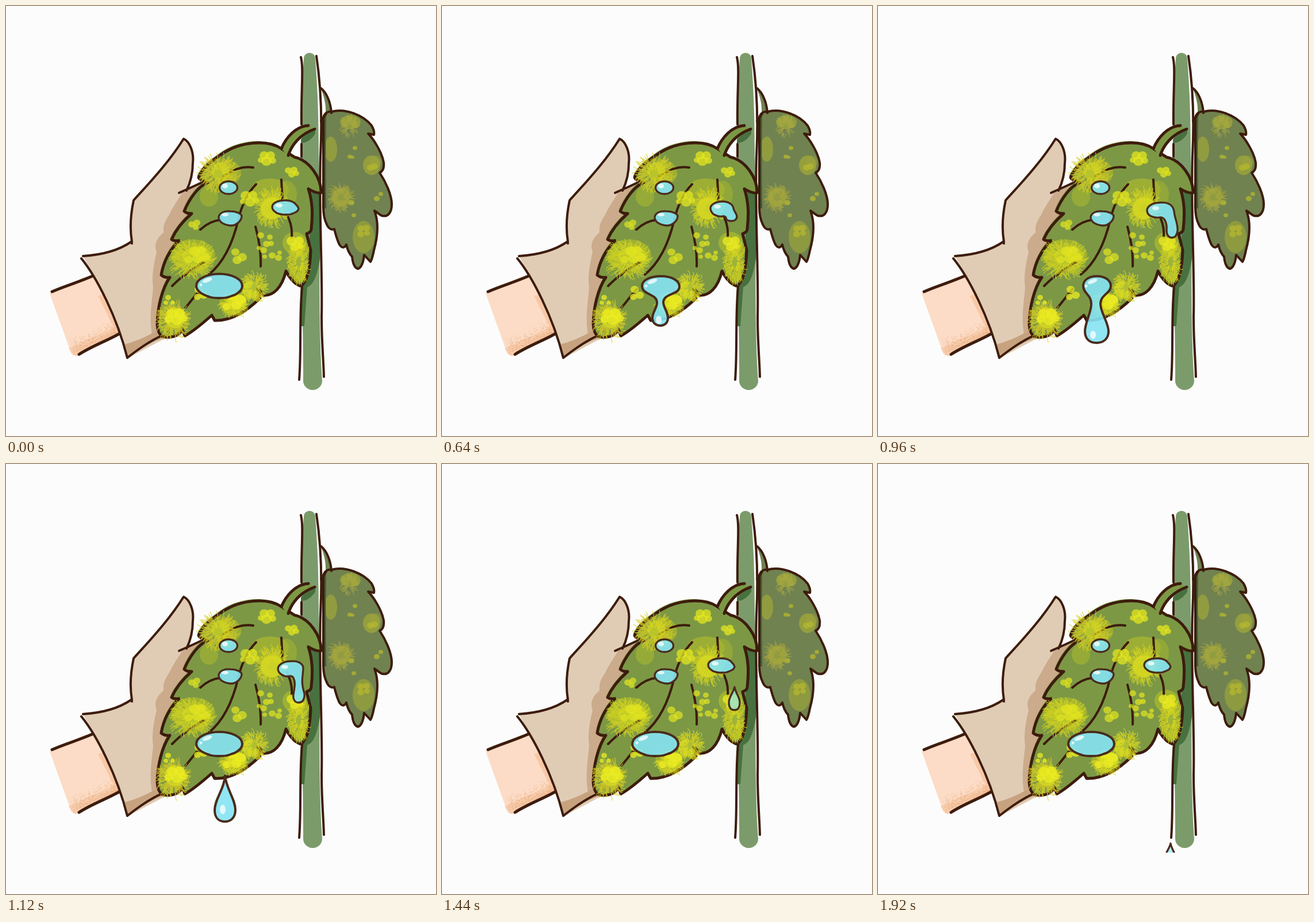
These frames come from a looping animation (748x748 px, 2000 ms). An HTML page:

```html
<!DOCTYPE html>
<html lang="en">
<head>
<meta charset="utf-8">
<title>Dripping leaf</title>
<style>
html, body { margin: 0; width: 100%; height: 100%; overflow: hidden; background: #fcfcfc; }
svg { display: block; width: 100vw; height: 100vh; }
.line { fill: none; stroke: #3d1c0d; stroke-width: 4; stroke-linecap: round; stroke-linejoin: round; }
.thick { stroke-width: 5; }
.water { fill: #86e4f3; fill-opacity: .9; stroke: #4a2b1c; stroke-width: 4; stroke-linejoin: round; }
.thin { stroke-width: 3.3; }
.fuzz { fill: none; stroke-linecap: round; stroke-width: 1.3; }
.shine { fill: #fff; opacity: .75; }

/* One drawing step lasts 80 ms, which is 4% of the loop. */
.anim { animation: 2s infinite; }
#bigPool { animation-name: bigPool; }
#bigShine { animation-name: bigShine; }
#bulbShine { animation-name: bulbShine; }
#bigDrop { animation-name: bigDrop; }
#sidePool { animation-name: sidePool; }
#sideShine { animation-name: sideShine; }
#sideDrop { animation-name: sideDrop; }

@keyframes bigPool {
  0%, 56%, 100% { animation-timing-function: steps(4);
    d: path("M331 487C331 475 349 466 371 466C393 466 411 475 411 487C411 493 405 499 397 503C393 504 391 505 388 506C383 508 376 508 371 508C366 508 359 508 354 506C351 505 348 504 344 502C337 499 331 493 331 487Z"); }
  16% { animation-timing-function: steps(4);
    d: path("M342 486C342 475 357 467 377 467C397 467 412 475 412 489C412 496 407 501 400 504C397 506 394 506 390 507C386 508 382 508 377 508C372 508 367 507 362 505C358 503 355 501 352 499C345 495 342 491 342 486Z"); }
  32% { animation-timing-function: steps(4);
    d: path("M348 487C348 477 362 470 381 470C400 470 413 478 413 488C413 503 385 499 385 516C386 526 393 532 393 543C393 551 387 556 380 556C372 556 366 551 366 543C366 532 374 526 374 516C374 500 348 503 348 487Z"); }
  48% { animation-timing-function: step-end;
    d: path("M357 487C357 477 366 470 381 470C396 470 405 478 405 487C405 500 387 502 387 518C387 534 401 550 401 566C401 579 392 586 380 586C368 586 360 579 360 566C360 550 371 534 371 518C371 502 357 500 357 487Z"); }
  52% { animation-timing-function: step-end;
    d: path("M362 486C362 478 369 472 381 472C393 472 400 478 400 486C400 497 384 502 384 518C384 540 401 562 401 582C401 596 392 604 380 604C368 604 361 596 361 582C361 562 379 540 379 518C379 502 362 497 362 486Z"); }
}
@keyframes bigShine {
  0%, 56%, 100% { transform: none; animation-timing-function: steps(4); }
  16% { transform: translate(11px, 0); animation-timing-function: steps(4); }
  32% { transform: translate(16px, 2px); animation-timing-function: steps(4); }
  48% { transform: translate(23px, 2px); animation-timing-function: step-end; }
}
@keyframes bulbShine {
  0%, 56%, 100% { opacity: 0; transform: translate(2px, -30px); animation-timing-function: step-end; }
  28% { opacity: .75; transform: translate(3px, -36px); animation-timing-function: steps(1); }
  32% { opacity: .75; transform: translate(3px, -26px); animation-timing-function: steps(4); }
  48% { opacity: .75; transform: none; animation-timing-function: step-end; }
  52% { opacity: .75; transform: translate(0, 17px); animation-timing-function: step-end; }
}
@keyframes bigDrop {
  0%, 72%, 100% { opacity: 0; animation-timing-function: step-end; }
  56% { opacity: 1; transform: none; animation-timing-function: step-end; }
  60% { opacity: 1; transform: translateY(28px); animation-timing-function: step-end; }
  64% { opacity: 1; transform: translateY(66px); animation-timing-function: step-end; }
  68% { opacity: 1; transform: translateY(113px); animation-timing-function: step-end; }
}
@keyframes sidePool {
  0%, 68%, 100% { animation-timing-function: steps(4);
    d: path("M463 350C463 342 474 338 486 338C493 338 500 340 504 345C507 348 509 350 509 353C508 356 506 358 503 359C500 361 498 361 496 362C493 363 490 363 487 363C480 363 475 362 471 360C466 357 463 354 463 350Z"); }
  16% { animation-timing-function: steps(4);
    d: path("M465 350C465 342 476 339 487 339C495 339 502 342 506 348C509 351 511 354 511 357C510 360 508 361 505 362C502 363 499 363 497 363C494 363 491 363 487 363C480 363 475 362 472 360C467 357 465 354 465 350Z"); }
  32% { animation-timing-function: steps(4);
    d: path("M467 352C467 345 477 340 488 340C498 340 506 345 507 352C508 358 513 361 513 367C512 373 507 374 503 374C498 374 494 372 494 368C493 366 490 365 487 366C480 367 476 364 472 362C469 359 467 356 467 352Z"); }
  48% { animation-timing-function: steps(2);
    d: path("M468 355C469 347 479 342 491 342C503 341 513 345 515 357C516 370 522 378 521 391C520 399 517 403 511 403C505 403 502 397 502 390C503 380 500 370 494 368C490 367 488 369 484 368C474 367 468 363 468 355Z"); }
  56% { animation-timing-function: steps(2);
    d: path("M473 356C474 348 484 343 496 343C508 342 516 347 517 354C517 370 512 376 519 399C520 409 516 415 509 415C502 415 499 409 500 401C502 388 504 380 500 372C497 366 491 371 485 369C478 367 473 362 473 356Z"); }
  64% { animation-timing-function: step-end;
    d: path("M478 356C479 349 487 345 497 345C507 344 515 349 515 355C514 370 509 380 519 407C520 416 515 422 509 422C502 422 499 416 500 408C503 391 507 382 503 374C499 367 494 370 489 368C482 366 478 361 478 356Z"); }
}
@keyframes sideShine {
  0%, 68%, 100% { transform: none; animation-timing-function: steps(8); }
  32% { transform: translate(4px, 2px); animation-timing-function: steps(6); }
  56% { transform: translate(10px, 6px); animation-timing-function: step-end; }
}
@keyframes sideDrop {
  0%, 100% { opacity: 0; animation-timing-function: step-end; }
  68% { opacity: 1; transform: translateY(-3px); animation-timing-function: step-end; }
  72% { opacity: 1; transform: none; animation-timing-function: step-end; }
  76% { opacity: 1; transform: translateY(8px); animation-timing-function: step-end; }
  80% { opacity: 1; transform: translateY(30px); animation-timing-function: step-end; }
  84% { opacity: 1; transform: translateY(68px); animation-timing-function: step-end; }
  88% { opacity: 1; transform: translateY(121px); animation-timing-function: step-end; }
  92% { opacity: 1; transform: translateY(189px); animation-timing-function: step-end; }
  96% { opacity: 1; transform: translateY(272px); animation-timing-function: step-end; }
}
</style>
</head>
<body>
<svg viewBox="0 0 748 748">
  <defs>
    <clipPath id="floor"><path d="M0 0H748V675.5H0Z"/></clipPath>
    <path id="backLeaf" d="M552 194C554 186 560 183 566 184C590 177 622 190 636 208C640 215 641 220 640 224L630 222C640 232 654 255 657 272C658 282 655 288 650 290C660 305 671 328 671 345C671 360 664 367 655 365C650 364 645 358 641 356C648 375 647 400 640 425C638 435 636 442 634 445L623 433C622 445 618 456 612 457C605 455 603 446 602 436C598 432 594 424 592 415C588 422 584 421 580 415C575 405 573 395 571 388C566 390 561 387 558 380C553 370 552 360 552 350Z"/>
    <path id="leaf" d="M479 248C455 232 405 235 372 260C350 275 340 285 335 298C337 304 346 305 351 307C335 313 319 335 310 357C314 361 318 361 323 361C308 374 295 390 288 406C292 409 296 409 301 408C284 425 274 445 270 468C275 472 280 473 285 472C271 492 264 525 263 550C263 566 268 576 278 576C290 577 301 573 307 563L311 574C326 566 341 553 358 538L363 547C392 548 420 530 442 508L438 492L447 503C465 505 480 490 487 461C491 470 501 484 513 487C526 478 529 450 530 425L523 396C529 394 531 391 531 388C534 360 533 340 526 318C534 323 542 326 548 325C549 300 528 268 502 263Z"/>
  </defs>

  <!-- stem -->
  <path fill="#7c9b6b" d="M518 92C518 78 538 78 538 92C541 130 544 180 544 260C548 400 542 540 550 652A16.5 16 0 0 1 517 652C518 560 510 400 514 240C515 160 516 120 518 92Z"/>
  <path fill="#48713f" d="M513 232C520 225 530 218 538 212L538 222C532 232 522 239 513 238ZM528 322L548 322L546 440C541 470 535 485 524 489L519 557H511L513 480L528 440Z"/>
  <path class="line" d="M513 89C518 108 513 150 514 206M514 240V262M515 488C510 540 514 600 510 650M540 87C548 140 550 200 547 260C544 350 551 470 549 540C549 585 552 610 553 645"/>

  <!-- back leaf -->
  <path fill="#6f8353" d="M548 144C560 154 565 170 566 188H556C557 170 553 157 548 144Z"/>
  <use href="#backLeaf" fill="#70824f"/>
  <g id="backSpots"></g>
  <path fill="#3f5c36" d="M550 194L557 188C556 240 556 300 557 352H550Z"/>
  <use href="#backLeaf" class="line"/>
  <path class="line" d="M548 143C559 152 565 170 566 186M548 200L557 187"/>

  <!-- arm -->
  <path fill="#fcdcc6" d="M76 500L135 472L152 469L201 565L128 607C120 611 114 607 112 600Z"/>
  <path fill="#f8c8a6" d="M160 504L177 501L190 538L198 567L178 578L189 562Z"/>
  <path fill="#f6c49e" opacity=".6" d="M109 595L190 558L201 566L128 608C118 610 114 606 109 595Z"/>
  <path id="grain" stroke="#e9a878" stroke-width="1.4" stroke-linecap="round" opacity=".65"/>
  <path class="line thick" d="M80 497C102 487 128 480 152 469M127 606C150 591 177 582 199 569"/>

  <!-- glove -->
  <path fill="#e0ccb5" d="M134 436C165 433 193 426 218 410C214 380 219 352 222 338C248 309 282 274 309 231C320 236 327 255 325 272C325 291 320 309 315 320L345 305L350 420L285 574L213 612C191 540 160 480 134 436Z"/>
  <path fill="#cbab8b" d="M345 305L306 326C295 343 289 352 284 363C276 375 273 382 274 394C262 404 257 415 262 428C257 450 253 470 256 490C253 520 249 545 254 571L300 570L350 400Z"/>
  <path fill="#c7a27f" d="M207 588C228 583 248 573 268 562L276 577C253 583 231 600 211 611Z"/>
  <path class="line" d="M134 435C165 433 195 426 218 410L219 413M219 410C214 380 219 352 222 338C248 309 282 274 309 231C320 236 327 255 325 272C325 291 320 309 314 321M301 325C315 319 330 312 345 305M131 439C157 471 193 540 211 612C231 596 251 582 272 573"/>

  <!-- front leaf -->
  <use href="#leaf" fill="#7c9845" transform="translate(-2 -3)"/>
  <use href="#leaf" fill="#7c9845"/>
  <path fill="#7c9845" d="M479 249C488 229 504 209 526 208L537 214C512 224 498 241 491 262Z"/>
  <g id="paleSpots"></g>
  <path class="line" d="M430 281C412 278 390 285 376 299M435 310C423 322 410 345 404 372C395 410 379 446 353 467M479 302L481 342M488 362C496 376 498 390 497 402M434 384C441 410 444 430 443 453M338 389C350 378 361 373 374 372M289 487C308 467 328 456 350 442M312 525C321 515 329 503 339 492"/>
  <use href="#leaf" class="line thick" style="stroke-dasharray:none"/>
  <path fill="#7c9845" d="M481 250C486 238 493 229 500 222L505 236C498 244 494 253 491 263Z"/>
  <path class="line thick" d="M479 248C487 229 504 209 526 208M491 260C497 241 512 223 537 214"/>
  <g id="brightSpots"></g>

  <!-- water -->
  <ellipse class="water thin" cx="387" cy="316" rx="15.5" ry="11"/>
  <ellipse class="shine" cx="381" cy="313" rx="5" ry="4"/>
  <path class="water thin" d="M370 368C370 360 380 356 390 357C400 357 410 361 410 366C409 375 400 382 391 382C380 381 370 376 370 368Z"/>
  <ellipse class="shine" cx="381" cy="363" rx="6" ry="3" opacity=".5"/>
  <g clip-path="url(#floor)">
    <path id="sidePool" class="water thin anim" d="M463 350C463 342 474 338 486 338C493 338 500 340 504 345C507 348 509 350 509 353C508 356 506 358 503 359C500 361 498 361 496 362C493 363 490 363 487 363C480 363 475 362 471 360C466 357 463 354 463 350Z"/>
    <ellipse id="sideShine" class="shine anim" cx="475" cy="347" rx="6" ry="3.5"/>
    <path id="bigPool" class="water anim" d="M331 487C331 475 349 466 371 466C393 466 411 475 411 487C411 493 405 499 397 503C393 504 391 505 388 506C383 508 376 508 371 508C366 508 359 508 354 506C351 505 348 504 344 502C337 499 331 493 331 487Z"/>
    <g id="bigShine" class="anim">
      <ellipse class="shine" cx="350" cy="477" rx="9" ry="3.5" transform="rotate(-22 350 477)"/>
      <circle class="shine" cx="339" cy="485" r="2.5"/>
    </g>
    <ellipse id="bulbShine" class="shine anim" cx="374" cy="572" rx="5" ry="7" opacity="0"/>
    <g id="bigDrop" class="anim" opacity="0">
      <path class="water" d="M381 542C383 565 399 583 399 602C399 615 391 622 381 622C370 622 363 615 363 602C363 583 380 565 381 542Z"/>
      <ellipse class="shine" cx="377" cy="601" rx="5" ry="8"/>
    </g>
    <g id="sideDrop" class="anim" opacity="0">
      <path class="water thin" style="fill-opacity:.68" d="M509 388C510 397 518 405 518 415C518 424 514 428 509 428C503 428 499 424 499 415C499 405 507 397 509 388Z"/>
    </g>
  </g>
</svg>
<script>
const byId = id => document.getElementById(id);
let seed = 11;
const rand = () => (seed = seed * 16807 % 2147483647) / 2147483647;

function add(group, tag, attrs) {
  const el = document.createElementNS("http://www.w3.org/2000/svg", tag);
  for (const key in attrs) el.setAttribute(key, attrs[key]);
  byId(group).append(el);
}

function blob(group, cx, cy, rx, ry, fill, opacity = 1) {
  add(group, "ellipse", { cx, cy, rx, ry, fill, opacity });
}

// Triples of x, y and radius
function dots(group, list, fill, opacity) {
  for (let i = 0; i < list.length; i += 3)
    blob(group, list[i], list[i + 1], list[i + 2], list[i + 2] * .9, fill, opacity);
}

// Short bent brush hairs that point away from the centre
function fuzz(group, cx, cy, rx, ry, count, stroke, opacity = .75) {
  let d = "";
  for (let i = 0; i < count; i++) {
    const a = rand() * 2 * Math.PI, r = .2 + rand() * .55, len = .15 + rand() * .25;
    const at = (k, turn) => [cx + Math.cos(a + turn) * rx * k, cy + Math.sin(a + turn) * ry * k]
      .map(v => v.toFixed(1)).join(" ");
    d += `M${at(r, 0)}Q${at(r + len / 2, .12)} ${at(r + len, (rand() - .5) * .3)}`;
  }
  add(group, "path", { d, stroke, opacity, class: "fuzz" });
}

const dull = "#9ca43b", olive = "#a5b531", lemon = "#e3e51f";

blob("backSpots", 599, 202, 18, 12, dull, .8);
fuzz("backSpots", 598, 209, 17, 20, 110, "#b1ae42", .6);
blob("backSpots", 565, 249, 11, 22, dull, .75);
blob("backSpots", 636, 277, 15, 17, dull, .85);
blob("backSpots", 643, 271, 10, 11, dull, .5);
blob("backSpots", 583, 333, 16, 16, dull, .75);
fuzz("backSpots", 583, 333, 23, 25, 180, "#aaa83e", .7);
blob("backSpots", 622, 402, 19, 28, dull, .7);
dots("backSpots", [607, 247, 4, 598, 262, 4, 603, 263, 3, 634, 281, 6, 641, 279, 6, 601, 342, 5, 605, 364, 4,
  645, 335, 5, 652, 327, 4, 617, 387, 6, 627, 386, 6, 617, 397, 6, 628, 395, 5], "#b4b72f", .75);

blob("paleSpots", 384, 290, 25, 22, olive, .8);
blob("paleSpots", 353, 331, 16, 18, olive, .65);
blob("paleSpots", 459, 320, 33, 20, olive, .8);
blob("paleSpots", 488, 328, 18, 24, olive, .55);
blob("paleSpots", 325, 433, 39, 27, olive, .85);
blob("paleSpots", 502, 412, 21, 19, olive, .85);
blob("paleSpots", 395, 517, 24, 20, olive, .85);

fuzz("brightSpots", 369, 292, 36, 34, 260, "#d9cf20");
blob("brightSpots", 373, 287, 16, 15, lemon, .4);
blob("brightSpots", 463, 352, 20, 19, lemon, .75);
fuzz("brightSpots", 464, 352, 30, 36, 260, "#d8d71f");
fuzz("brightSpots", 324, 441, 40, 34, 300, "#d5d41f");
blob("brightSpots", 332, 436, 26, 17, lemon, .35);
fuzz("brightSpots", 509, 446, 20, 42, 250, "#d9d61d");
blob("brightSpots", 510, 444, 8, 18, lemon, .35);
fuzz("brightSpots", 291, 547, 30, 34, 280, "#dccf20");
blob("brightSpots", 294, 542, 18, 18, lemon, .6);
fuzz("brightSpots", 432, 489, 25, 27, 220, "#dcd91f");
blob("brightSpots", 426, 494, 15, 15, lemon, .5);
fuzz("brightSpots", 397, 521, 27, 21, 180, "#dcd91f");
blob("brightSpots", 402, 513, 16, 12, lemon, .7);

dots("brightSpots", [449, 260, 8, 460, 260, 8, 453, 270, 9, 443, 268, 5, 464, 269, 6,
  491, 286, 6, 501, 285, 6, 497, 293, 6, 505, 291, 5, 417, 330, 9, 429, 329, 8, 425, 341, 9, 435, 338, 6, 412, 340, 5], lemon, .75);
dots("brightSpots", [323, 380, 6, 332, 377, 6, 330, 385, 5, 399, 428, 7, 411, 437, 8, 402, 442, 8,
  443, 399, 6, 459, 402, 5, 453, 414, 6, 461, 413, 5, 448, 425, 6, 440, 421, 4, 450, 436, 4, 463, 434, 6, 474, 438, 6, 476, 429, 4,
  328, 426, 9, 340, 425, 8, 333, 439, 9, 347, 437, 8, 318, 441, 7], lemon, .7);
dots("brightSpots", [497, 409, 9, 510, 408, 8, 502, 419, 8, 513, 418, 5, 282, 507, 5, 290, 516, 4, 278, 516, 4,
  335, 493, 7, 344, 503, 7, 333, 506, 6, 289, 535, 9, 302, 534, 9, 297, 546, 10, 309, 543, 7, 283, 545, 7,
  395, 506, 8, 408, 511, 9, 400, 521, 9, 384, 523, 7], "#ecec22", .75);

let grain = "";
for (let i = 0; i < 420; i++) {
  const u = rand(), depth = rand() * rand() * 25;
  grain += `M${(117 + u * 80 - depth * .3).toFixed(1)} ${(604 - u * 37 - depth).toFixed(1)}h.1`;
}
byId("grain").setAttribute("d", grain);
</script>
</body>
</html>
```
